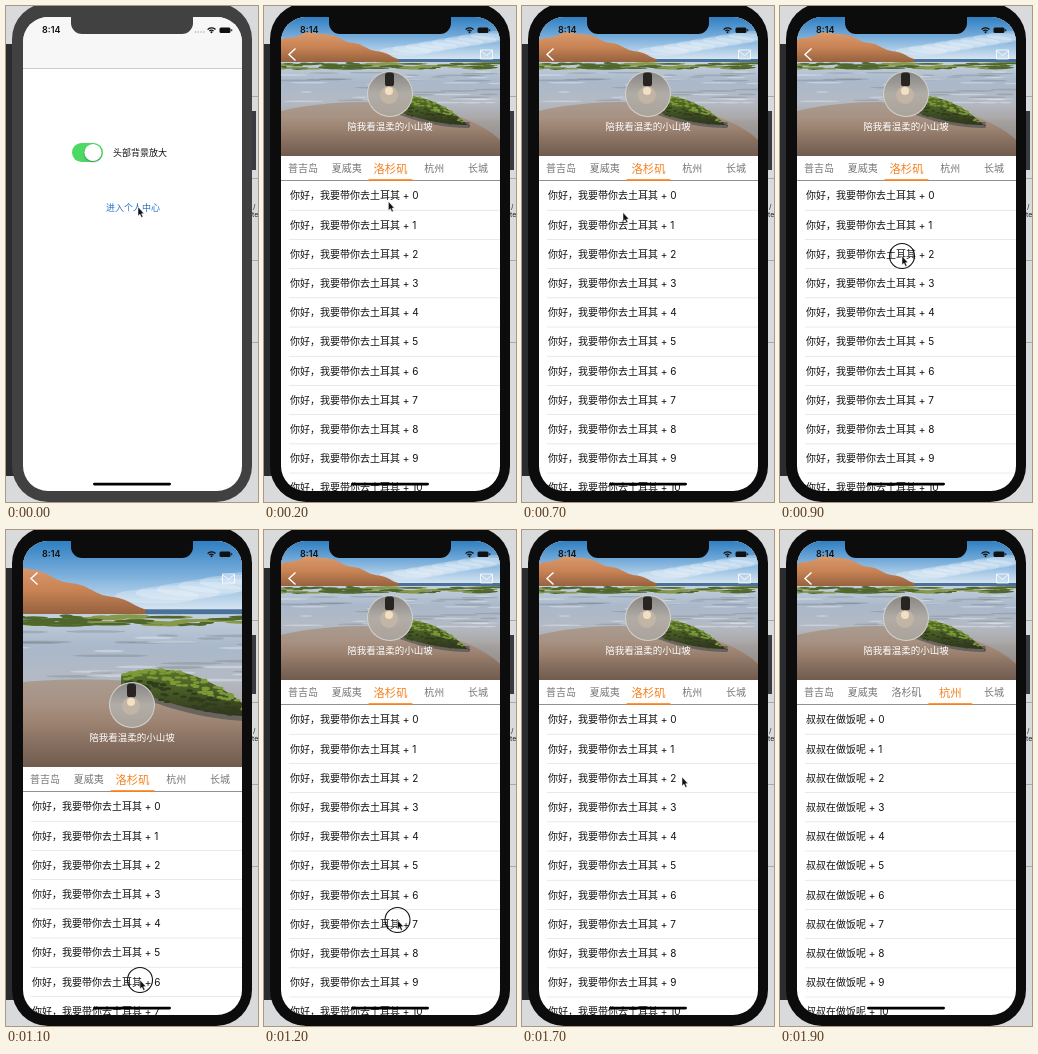
Recreate the animation shown at these times as an HTML page with a canvas. Size 252 px wide and 496 px high, loop 2 s.

```html
<!DOCTYPE html>
<html lang="zh-CN">
<head>
<meta charset="utf-8">
<style>
html, body { margin: 0; width: 100%; height: 100%; overflow: hidden; }
canvas { display: block; width: 252px; height: 496px; }
</style>
</head>
<body>
<canvas></canvas>
<script>
const canvas = document.querySelector('canvas');
const ratio = window.devicePixelRatio || 1;
canvas.width = 252 * ratio;
canvas.height = 496 * ratio;
const c = canvas.getContext('2d');

const FONT = 'Inter, "Noto Sans CJK SC", "Noto Sans CJK", sans-serif';
const ORANGE = '#ff7f12';
const INK = '#111';
const LEFT = 17, TOP = 11, WIDTH = 219, HEIGHT = 474;
const NAV_BOTTOM = 62, HEADER_BOTTOM = 150, ROW_H = 29.2;
const TABS = ['普吉岛', '夏威夷', '洛杉矶', '杭州', '长城'];
const TAB_W = WIDTH / TABS.length;
const POINTER_STOPS = [
  { t: 100, x: 132, y: 201 }, { t: 500, x: 80, y: 163 }, { t: 900, x: 122, y: 250 },
  { t: 1100, x: 134, y: 450 }, { t: 1400, x: 132, y: 210 }, { t: 1700, x: 160, y: 247 }
];

const clamp = v => Math.min(1, Math.max(0, v));
const ease = v => (1 - Math.cos(Math.PI * clamp(v))) / 2;
const progress = (t, from, to) => clamp((t - from) / (to - from));
// Rises smoothly to 1 at the peak and falls back to 0.
const bump = (t, from, peak, to) =>
  ease(t < peak ? progress(t, from, peak) : progress(t, to, peak));

function seeded(seed) {
  return () => (seed = seed * 16807 % 2147483647) / 2147483647;
}

function rect(x, y, w, h, color) {
  c.fillStyle = color;
  c.fillRect(x, y, w, h);
}

function round(x, y, w, h, r, color) {
  c.beginPath();
  c.roundRect(x, y, w, h, r);
  c.fillStyle = color;
  c.fill();
}

function ellipse(x, y, rx, ry, color) {
  c.beginPath();
  c.ellipse(x, y, rx, ry, 0, 0, Math.PI * 2);
  c.fillStyle = color;
  c.fill();
}

const disc = (x, y, r, color) => ellipse(x, y, r, r, color);

function path(...p) {
  c.beginPath();
  for (let i = 0; i < p.length; i += 2) c.lineTo(p[i], p[i + 1]);
}

function stroke(color, width) {
  c.strokeStyle = color;
  c.lineWidth = width;
  c.stroke();
}

// Fills the area between two curves.
function band(x0, x1, top, bottom, color) {
  c.beginPath();
  for (let x = x0; x <= x1; x++) c.lineTo(x, top(x));
  for (let x = x1; x >= x0; x--) c.lineTo(x, bottom(x));
  c.fillStyle = color;
  c.fill();
}

function text(s, x, y, size, color, align = 'left', weight = 400) {
  c.font = `${weight} ${size}px ${FONT}`;
  c.textAlign = align;
  c.fillStyle = color;
  c.fillText(s, x, y + size * .37);
}

function gradient(y0, y1, ...colors) {
  const g = c.createLinearGradient(0, y0, 0, y1);
  colors.forEach((color, i) => g.addColorStop(i / (colors.length - 1), color));
  return g;
}

function drawDesktop() {
  rect(0, 0, 252, 496, '#d9dadc');
  rect(0, 38, 20, 432, '#2b2c30');
  rect(246, 105, 4, 59, '#3a3a40');
  for (let y = 90; y < 340; y += 82) rect(246, y, 6, 1, '#aaa');
  text('/', 247, 200, 7, '#222');
  text('te', 246, 208, 7, '#222');
}

function drawSky() {
  rect(-110, 0, 220, 46, gradient(0, 43, '#2f7fc2', '#7db0dc', '#d9e6f1'));
  for (let i = 0; i < 8; i++) {
    ellipse(15 + i * 13, 34 - i * 2.2, 26, 4.5, 'rgba(245,247,250,.3)');
  }
}

function drawShore(random) {
  const ridge = x => 16 + 27 * Math.max(0, (x + 67) / 80) + Math.sin(x / 4) * .8
    + Math.max(0, -85 - x) * .3;
  band(-110, 12, ridge, () => 45, gradient(15, 45, '#d99a6c', '#c98355', '#95623f'));
  rect(8, 42, 110, 4, '#4a7199');
  rect(-110, 45, 220, 65, gradient(45, 105, '#c3d0de', '#a9b8ca', '#b4bac4', '#a8a4a2'));
  for (let i = 0; i < 90; i++) {
    const x = random() * 220 - 110, y = 46 + random() * 6;
    ellipse(x, y, 4 + random() * 9, .9, i % 3 ? '#50672c' : '#87984a');
  }
  for (let i = 0; i < 45; i++) {
    const x = random() * 220 - 110, y = 55 + random() * 32;
    ellipse(x, y, 6 + random() * 18, .8, i % 2 ? 'rgba(235,240,248,.4)' : 'rgba(110,112,118,.3)');
  }
  ellipse(-30, 145, 150, 60, gradient(85, 139, '#a99b91', '#a68b78', '#89705f'));
}

function drawRock(random) {
  const top = x => 79 + .0075 * (x - 15) ** 2;
  const bottom = x => 108 - 20 * ((79 - x) / 86) ** 2;
  band(-7, 79, x => bottom(x) - 3, x => bottom(x) + 3, '#6b6660');
  band(-7, 79, top, bottom, gradient(78, 108, '#59752a', '#465925', '#30341f'));
  for (let i = 0; i < 150; i++) {
    const x = -5 + random() * 78, depth = random() ** 1.5;
    const y = top(x) + depth * (bottom(x) - top(x));
    ellipse(x, y, 2, .8, depth < .45 ? '#7c9a36' : '#303d1d');
  }
}

// Beach scene, scaled from its top centre to fill the header.
function drawPhoto(height) {
  const random = seeded(7);
  c.save();
  c.beginPath();
  c.rect(LEFT, TOP, WIDTH, height);
  c.clip();
  c.translate(126.5, TOP);
  c.scale(height / 139, height / 139);
  rect(-110, 0, 220, 139, '#a8a4a2');
  drawSky();
  drawShore(random);
  drawRock(random);
  rect(-110, 100, 220, 39, gradient(100, 139, 'rgba(55,45,40,0)', 'rgba(55,45,40,.3)'));
  c.restore();
}

function drawAvatar(x, y) {
  c.save();
  disc(x, y, 23, '#d4d1cd');
  disc(x, y, 22, gradient(y - 22, y + 22, '#888785', '#b1aca6', '#aaa39b'));
  round(x - 5, y - 21.5, 9, 14, 3, '#272422');
  disc(x - 1, y + 1, 9, '#c2b5a6');
  disc(x - 1, y - 3, 4, '#f3dfc1');
  c.restore();
}

function drawHome() {
  rect(LEFT, TOP, WIDTH, HEIGHT, '#fff');
  rect(LEFT, TOP, WIDTH, NAV_BOTTOM - TOP, '#f7f7f7');
  rect(LEFT, NAV_BOTTOM, WIDTH, .7, '#b5b5b5');
  round(66, 137, 31, 19, 9.5, '#4cd964');
  c.save();
  c.shadowColor = 'rgba(0,0,0,.35)';
  c.shadowBlur = 2 * ratio;
  c.shadowOffsetY = ratio;
  disc(87, 146.5, 8.6, '#fff');
  c.restore();
  text('头部背景放大', 107, 147, 9, INK);
  text('进入个人中心', 100, 201.5, 9, '#2472c8');
}

function drawRows(label, x, scroll) {
  for (let i = 0; i < 18; i++) {
    const y = 189.6 + i * ROW_H - scroll;
    text(`${label} + ${i}`, x + 26, y, 10, INK);
    rect(x + 25, y + 14.3, 211, .7, '#e0e0e0');
  }
}

function drawTabs(top, selected) {
  rect(LEFT, top, WIDTH, 25, '#fff');
  rect(LEFT, top + 24, WIDTH, .8, '#777');
  rect(LEFT + TAB_W * selected, top + 23.2, TAB_W, 1.6, ORANGE);
  TABS.forEach((name, i) => {
    const on = i === selected;
    text(name, LEFT + TAB_W * (i + .5), top + 12.5, on ? 11.4 : 10, on ? '#f58220' : '#777', 'center');
  });
}

function drawNavIcons() {
  path(31.5, 42.5, 25, 48.5, 31.5, 54.5);
  stroke('#fff', 1.4);
  c.beginPath();
  c.rect(216.5, 44, 12, 9);
  stroke('#fff', .8);
  path(216.5, 44.5, 222.5, 49.5, 228.5, 44.5);
  stroke('#fff', .8);
}

function drawCenter(scroll, swipe) {
  const edge = HEADER_BOTTOM - scroll;
  const bottom = Math.max(NAV_BOTTOM, edge);
  rect(LEFT, TOP, WIDTH, HEIGHT, '#fff');
  drawRows('你好\uff0c我要带你去土耳其', -WIDTH * swipe, scroll);
  if (swipe > 0) drawRows('叔叔在做饭呢', WIDTH * (1 - swipe), scroll);
  drawPhoto(bottom - TOP);
  drawAvatar(126, edge - 62);
  text('陪我看温柔的小山坡', 126, edge - 29.5, 9.5, '#fff', 'center');
  c.globalAlpha = clamp(scroll / (HEADER_BOTTOM - NAV_BOTTOM));
  rect(LEFT, TOP, WIDTH, bottom - TOP, ORANGE);
  c.globalAlpha = 1;
  drawTabs(bottom, swipe > .5 ? 3 : 2);
  drawNavIcons();
}

function drawStatus(signal) {
  text('8:14', 36, 24, 9, INK, 'left', 600);
  if (signal) for (let i = 0; i < 4; i++) disc(189.5 + i * 2.8, 26, .8, '#aaa');
  for (const r of [2.8, 5.2]) {
    c.beginPath();
    c.arc(205.5, 27, r, -Math.PI * .77, -Math.PI * .23);
    stroke(INK, 1.3);
  }
  disc(205.5, 26.3, 1, INK);
  round(213.5, 21.5, 11, 5.5, 1.5, INK);
  rect(225.2, 23.2, 1, 2, INK);
}

function drawPointer(t) {
  const next = Math.max(1, POINTER_STOPS.findIndex(stop => stop.t >= t));
  const a = POINTER_STOPS[t > 1700 ? 5 : next - 1], b = POINTER_STOPS[t > 1700 ? 5 : next];
  const f = a === b ? 0 : ease(progress(t, a.t, b.t));
  c.save();
  c.translate(a.x + (b.x - a.x) * f, a.y + (b.y - a.y) * f);
  if (t >= 900 && t < 1700) {
    c.beginPath();
    c.arc(0, 0, 12.5, 0, Math.PI * 2);
    stroke(INK, 1.1);
  }
  path(0, 0, 0, 9, 2, 7.2, 3.5, 10.5, 5, 9.8, 3.6, 6.7, 6, 6.5);
  c.closePath();
  c.fillStyle = INK;
  c.fill();
  stroke('#fff', .5);
  c.restore();
}

function shifted(x, drawPage) {
  c.save();
  c.translate(x, 0);
  drawPage();
  c.restore();
}

function draw(t) {
  const push = 1 - (1 - progress(t, 0, 200)) ** 2;
  const scroll = 186 * bump(t, 1200, 1400, 1700) - 87 * bump(t, 900, 1100, 1200);
  const swipe = ease(progress(t, 1700, 1900));
  const bezel = t < 100 ? '#414141' : '#0c0c0c';
  c.setTransform(ratio, 0, 0, ratio, 0, 0);
  drawDesktop();
  round(6, -3, 240, 499, 36, bezel);

  c.save();
  c.beginPath();
  c.roundRect(LEFT, TOP, WIDTH, HEIGHT, 25);
  c.clip();
  if (push < 1) shifted(-WIDTH * .3 * push, drawHome);
  if (push > 0) shifted(WIDTH * (1 - push), () => drawCenter(scroll, swipe));
  drawStatus(push < 1);
  round(87, 476.7, 78, 2.8, 1.4, '#000');
  c.restore();

  round(65, 5, 122, 23, [0, 0, 11, 11], bezel);
  if (t < 1900) drawPointer(t);
}

// The picture advances in tenths of a second.
function tick() {
  draw(Math.floor(performance.now() % 2000 / 100) * 100);
  requestAnimationFrame(tick);
}
tick();
</script>
</body>
</html>
```
